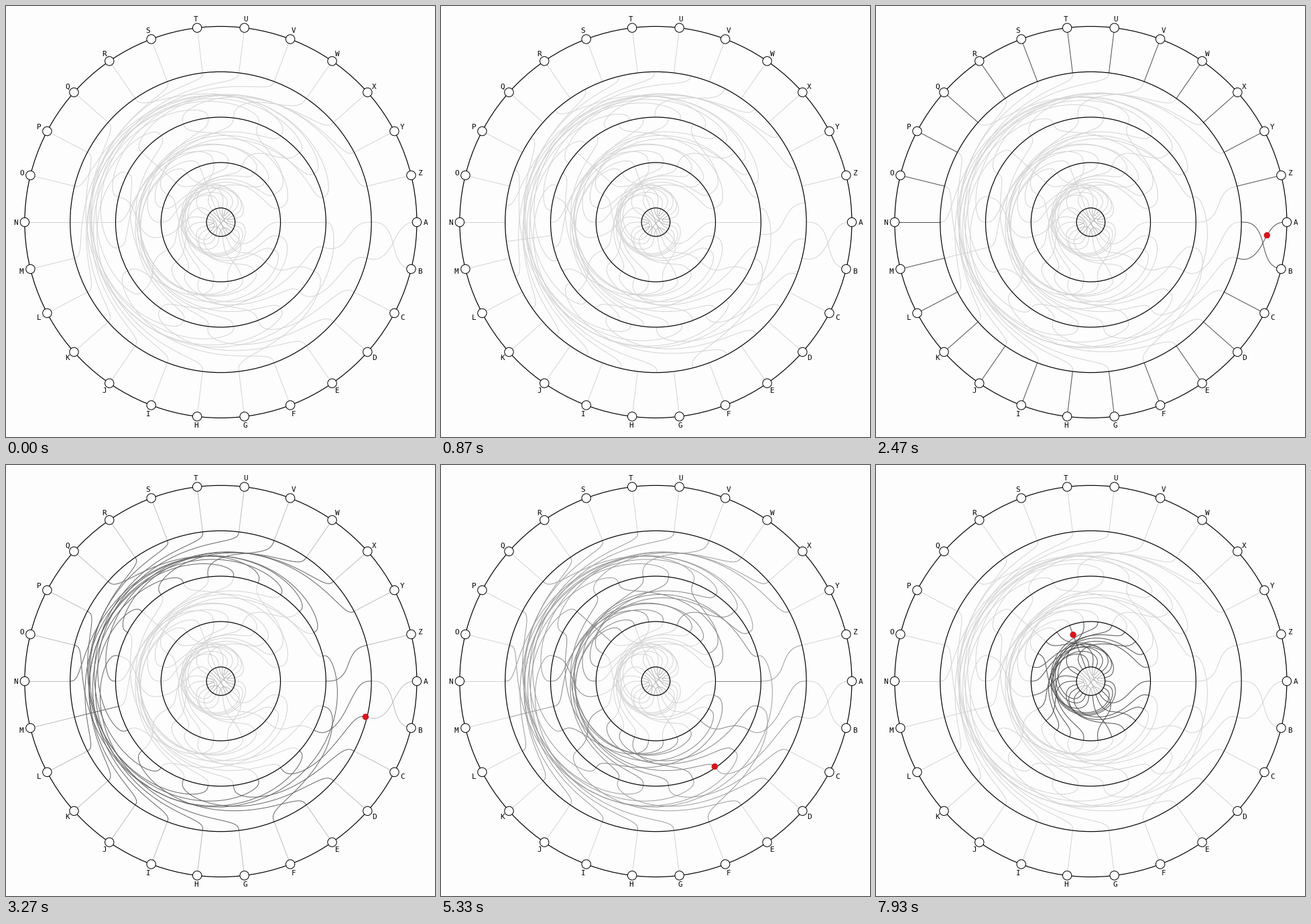
A matplotlib script for the animation above (8000 ms loop, 640 by 644 pixels).

```python
import numpy as np
import matplotlib.pyplot as plt
from matplotlib.animation import FuncAnimation
from matplotlib.collections import LineCollection
from matplotlib.patches import Circle

W, H, DPI = 640, 644, 100
PX = 72 / DPI
LOOP, INTERVAL = 8000, 64
CX, CY = 320.4, 323
RADII = [292.5, 224.7, 156.9, 89.1, 21.3]
STEP = 2 * np.pi / 26
LETTERS = "ABCDEFGHIJKLMNOPQRSTUVWXYZ"

# Plugboard, then rotors III, II and I, from the outside in
WIRING = [
    "BACDEFGHIJKLMNOPQRSTUVWXYZ",
    "BDFHJLCPRTXVZNYEIWGAKMUSQO",
    "AJDKSIRUXBLHWTMCQGZNPYFVOE",
    "EKMFLGDQVZNTOWYHXUSPAIBRCJ",
]
REFLECTOR = "YRUHQSLDPXNGOKMIEBFZCWVJAT"
SIGNAL = [0, 1, 4, 18, 18]

BG, INK, RED = "#fdfdfd", "black", "#d3151f"
PALE, DARK = 0.83, 0.31

SPIN_START, SPIN_TIME = 66, 1500
FADE_STARTS, FADE_TIME = [1830, 2850, 5020, 7080], 500
# The dot rests at each ring while the next layer lights up
DOT_TIMES = [1870, 3230, 3420, 5110, 5550, 7230, 7510, 9200]
DOT_STAGES = [0, 1.03, 1.045, 2.02, 2.04, 3.01, 3.01, 3.99]


def ease(u):
    u = np.clip(u, 0, 1)
    return np.where(u < 0.5, 4 * u**3, 1 - 4 * (1 - u) ** 3)


def polar(radius, index):
    angle = np.asarray(index) * STEP
    return np.stack([CX + radius * np.cos(angle),
                     CY + radius * np.sin(angle)], axis=-1)


def wire(layer, start, end, u):
    """Point on a wire; radius runs evenly while the angle eases."""
    radius = RADII[layer] + (RADII[layer + 1] - RADII[layer]) * u
    return polar(radius, start + (end - start) * ease(u))


def layer_wires(layer, turn=0.0):
    u = np.linspace(0, 1, 90)
    return [wire(layer, i - turn, LETTERS.index(c) - turn, u)
            for i, c in enumerate(WIRING[layer])]


def reflector_wires():
    u = np.linspace(0, 1, 24)[:, None]
    center = np.array([CX, CY])
    wires = []
    for i, c in enumerate(REFLECTOR):
        j = LETTERS.index(c)
        if i < j:
            a, b = polar(RADII[-1], i), polar(RADII[-1], j)
            wires.append((1 - u) ** 2 * a + 2 * u * (1 - u) * center + u**2 * b)
    return wires


def fade_in(layer, t):
    if layer >= len(FADE_STARTS):
        return 0.0
    return float(np.clip((t - FADE_STARTS[layer]) / FADE_TIME, 0, 1))


def layer_color(layer, t):
    lit = fade_in(layer, t) - fade_in(layer + 1, t)
    return str(round(PALE + (DARK - PALE) * lit, 4))


fig = plt.figure(figsize=(W / DPI, H / DPI), dpi=DPI, facecolor=BG)
ax = fig.add_axes([0, 0, 1, 1])
ax.set_xlim(0, W)
ax.set_ylim(H, 0)
ax.axis("off")

layers = []
for k in range(len(WIRING)):
    lines = LineCollection(layer_wires(k), linewidths=PX, colors=str(PALE), zorder=1)
    ax.add_collection(lines)
    layers.append(lines)
ax.add_collection(LineCollection(reflector_wires(), linewidths=PX,
                                 colors="0.72", zorder=1))

for r in RADII:
    ax.add_patch(Circle((CX, CY), r, fill=False, ec=INK, lw=1.2 * PX, zorder=2))
for i, letter in enumerate(LETTERS):
    ax.add_patch(Circle(polar(RADII[0], i), 6.7, fc="white", ec=INK,
                        lw=PX, zorder=3))
    x, y = polar(306, i)
    ax.text(x, y + 3.5, letter, ha="center", va="baseline", color=INK,
            family="DejaVu Sans Mono", size=11 * PX)

dot = Circle((0, 0), 4.7, fc=RED, ec="none", zorder=4, visible=False)
ax.add_patch(dot)


def draw(frame):
    t = frame * INTERVAL
    turn = float(ease((t - SPIN_START) / SPIN_TIME))
    layers[1].set_segments(layer_wires(1, turn))
    for k, lines in enumerate(layers):
        lines.set_color(layer_color(k, t))
        lines.set_zorder(1 + 0.1 * fade_in(k, t))

    stage = float(np.interp(t, DOT_TIMES, DOT_STAGES))
    k = int(stage)
    dot.center = tuple(wire(k, SIGNAL[k], SIGNAL[k + 1], stage - k))
    dot.set_visible(t >= FADE_STARTS[0])
    return [*layers, dot]


anim = FuncAnimation(fig, draw, frames=LOOP // INTERVAL, interval=INTERVAL,
                     repeat=True, repeat_delay=0, blit=False)
plt.show()
```
